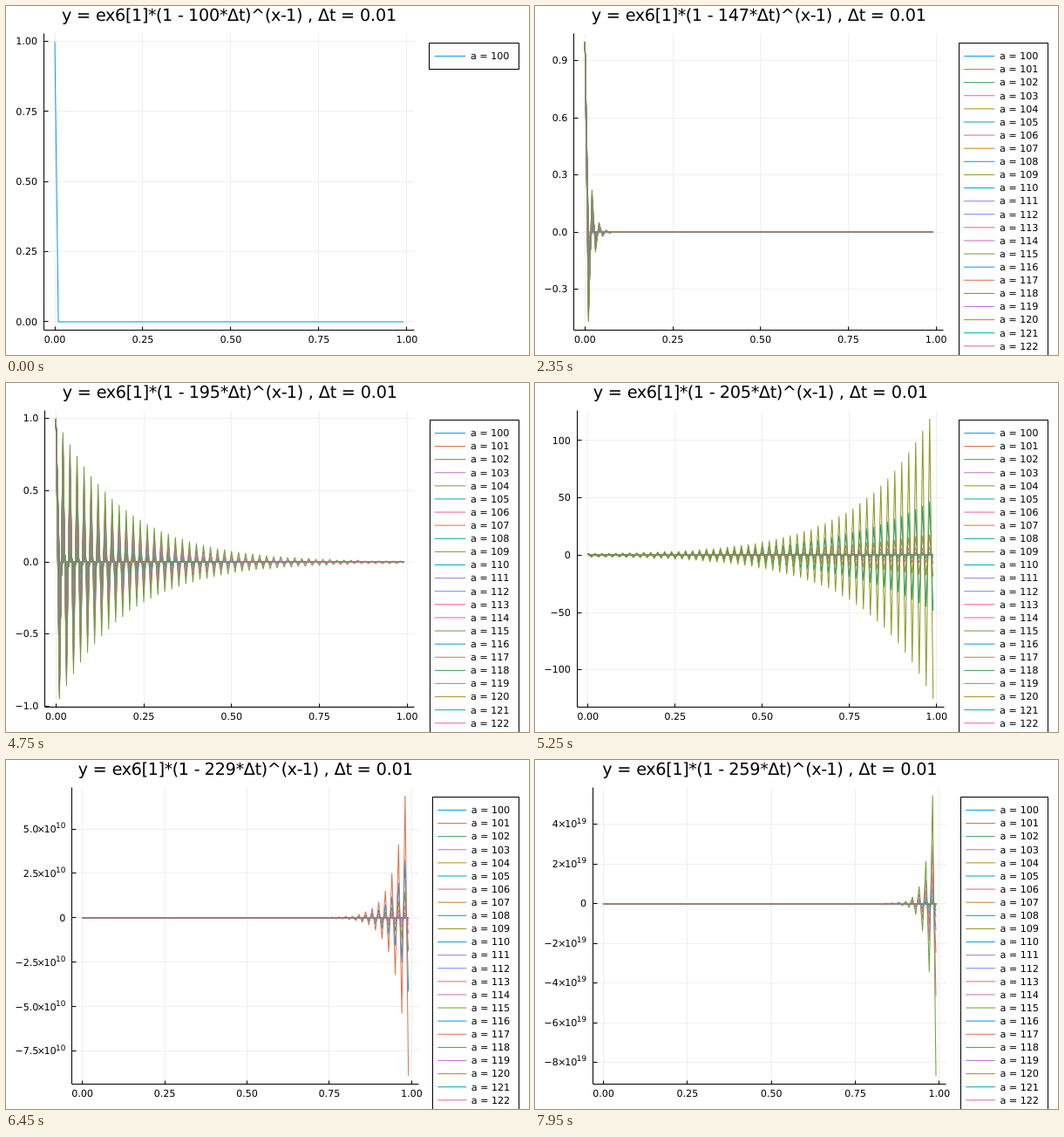
Write a matplotlib script that moves like this. It is 600x400 px and loops after 8000 ms.

```python
import math

import numpy as np
import matplotlib.pyplot as plt
from matplotlib.animation import FuncAnimation
from matplotlib.collections import LineCollection
from matplotlib.patches import PathPatch, Rectangle
from matplotlib.path import Path
from matplotlib.textpath import TextPath

plt.rcParams["font.family"] = "DejaVu Sans"

WIDTH, HEIGHT, DPI = 600, 400, 100
FRAMES, INTERVAL = 160, 50
FIRST_A, DT, POINTS = 100, 0.01, 100
PX = 72 / DPI

TOP, BOTTOM = 31.0, 371.5
SMALL, SUP, LARGE = 11.1, 8.9, 19.25
TICK = 4.5
LEGEND_TOP, LEGEND_RIGHT, ROW = 42.3, 588, 15.11
VISIBLE_ROWS = 23

PALETTE = ["#009AFA", "#E36F47", "#3EA44E", "#C371D2", "#AC8E18", "#00AAAE",
           "#ED5E93", "#C68225", "#00A98D", "#8E971E", "#00A9CC", "#9B7FE8",
           "#618CF6", "#F06073", "#DD65B6", "#6C9F33"]
COLORS = [PALETTE[i % len(PALETTE)] for i in range(FRAMES)]

times = np.arange(POINTS) * DT
ratios = -np.arange(FRAMES) / 100
curves = ratios[:, None] ** np.arange(POINTS)[None, :]


# ---- text ----

glyphs = {}


def glyph(char, size):
    key = char, size
    if key not in glyphs:
        wide = TextPath((0, 0), f"|{char}|", size=100).get_extents().width
        bare = TextPath((0, 0), "||", size=100).get_extents().width
        advance = (wide - bare) * size / 100
        if size == LARGE:
            advance = int(advance)  # large type steps by whole pixels
        if char == " ":
            glyphs[key] = None, None, advance
        else:
            path = TextPath((0, 0), char, size=size)
            glyphs[key] = path.vertices * [1, -1], path.codes, advance
    return glyphs[key]


def text_width(text, size):
    return sum(glyph(c, size)[2] for c in text)


class Writer:
    def __init__(self):
        self.verts, self.codes = [], []

    def put(self, text, x, y, size=SMALL, align=0.0):
        x -= align * text_width(text, size)
        y = round(y)
        for char in text:
            verts, codes, advance = glyph(char, size)
            if verts is not None:
                self.verts.append(verts + [x, y])
                self.codes.append(codes)
            x += advance

    def path(self):
        return Path(np.concatenate(self.verts), np.concatenate(self.codes))


# ---- ticks ----

NICE = [(5.0, 0.9), (3.0, 0.2), (2.5, 0.5), (2.0, 0.7), (1.0, 1.0)]


def find_ticks(lo, hi):
    """Pick the step with the best mix of count, coverage and niceness."""
    span = hi - lo
    order = math.floor(math.log10(span))
    best, choice = -1, None
    for exp in range(order + 1, order - 3, -1):
        for q, nice in NICE:
            step = q * 10.0 ** exp
            first, last = math.ceil(lo / step), math.floor(hi / step)
            count = last - first + 1
            if not 4 <= count <= 8:
                continue
            granularity = 1 - abs(count - 5) / 5
            coverage = 1.5 * span / ((count - 1) * step)
            score = granularity / 4 + coverage / 3 + nice / 4
            if score > best + 1e-9:
                best = score
                choice = [i * step for i in range(first, last + 1)]
    return choice


def decimals(values):
    d = 0
    while any(abs(round(v, d) - v) > 1e-7 for v in values):
        d += 1
    return d


def make_labels(ticks):
    """Return (number, exponent) pairs; the exponent is empty for plain ones."""
    if ticks[-1] - ticks[0] <= 1e4 * (1 + 1e-9):
        d = decimals(ticks)
        return [(f"{v:.{d}f}".replace("-", "−"), "") for v in ticks]
    exps = [math.floor(math.log10(abs(v)) + 1e-9) if v else 0 for v in ticks]
    mants = [v / 10.0 ** e for v, e in zip(ticks, exps)]
    d = decimals(mants)
    return [(f"{m:.{d}f}".replace("-", "−"), str(e)) if m else ("0", "")
            for m, e in zip(mants, exps)]


CROSS, TEN = 8, 13


def mantissa_width(number):
    return text_width(number, SMALL) - 1.3 * ("." in number)


def label_width(label):
    number, exp = label
    if not exp:
        return text_width(number, SMALL)
    return mantissa_width(number) + CROSS + TEN + text_width(exp, SUP)


def put_label(writer, label, right, y):
    number, exp = label
    x = right - label_width(label)
    writer.put(number, x, y)
    if exp:
        x += mantissa_width(number)
        writer.put("×", x - 0.5, y)
        writer.put("10", x + CROSS - 0.5, y)
        writer.put(exp, x + CROSS + TEN, y - 4.8, SUP)


# ---- figure ----

fig = plt.figure(figsize=(WIDTH / DPI, HEIGHT / DPI), dpi=DPI, facecolor="white")
ax = fig.add_axes([0, 0, 1, 1])
ax.set_xlim(0, WIDTH)
ax.set_ylim(HEIGHT, 0)
ax.axis("off")


def add_lines(color, zorder, snap):
    lines = LineCollection([], colors=color, linewidths=PX, zorder=zorder)
    lines.set_snap(snap)
    return ax.add_collection(lines, autolim=False)


grid = add_lines("#efefef", 1, True)
frame_lines = add_lines("black", 2, True)
data = add_lines(COLORS, 3, False)
box = ax.add_patch(Rectangle((0, 0), 1, 1, fc="white", ec="black", lw=PX, zorder=4))
keys = add_lines(COLORS, 5, False)
words = ax.add_patch(PathPatch(Path([(0, 0)]), fc="black", lw=0, zorder=6))


def pixel(v):
    # a little above the edge, so that snapping always picks this pixel
    return math.floor(v) + 0.1


def update(i):
    a = FIRST_A + i
    shown = curves[:i + 1]
    lo, hi = shown.min(), shown.max()
    pad = 0.03 * (hi - lo)
    lo, hi = lo - pad, hi + pad

    ticks = find_ticks(lo, hi)
    labels = make_labels(ticks)
    widest = max(labels, key=label_width)
    left = label_width(widest) + (18.4 if widest[0][0] == "−" else 19.3)
    width = (544.8 - left) / 1.1814
    right = left + width

    def to_x(t):
        return left + (t + 0.0297) / 1.0494 * width

    def to_y(v):
        return BOTTOM - (v - lo) / (hi - lo) * (BOTTOM - TOP)

    writer = Writer()
    x_axis, y_axis = pixel(BOTTOM), pixel(left - 0.5)
    grid_segs = []
    black = [[(y_axis, TOP), (y_axis, x_axis)],
             [(y_axis, x_axis), (right, x_axis)]]
    for t in np.arange(5) / 4:
        x = pixel(to_x(t))
        grid_segs.append([(x, TOP), (x, BOTTOM)])
        black.append([(x, x_axis), (x, x_axis - TICK)])
        writer.put(f"{t:.2f}", to_x(t), 386, align=0.5)
    for v, label in zip(ticks, labels):
        y = pixel(to_y(v))
        grid_segs.append([(left, y), (right, y)])
        black.append([(y_axis, y), (y_axis + TICK, y)])
        put_label(writer, label, left - 8, to_y(v) + 3.7)
    grid.set_segments(grid_segs)
    frame_lines.set_segments(black)

    xs = np.broadcast_to(to_x(times), shown.shape)
    data.set_segments(np.stack([xs, np.round(to_y(shown))], axis=-1))

    unit = width / 36
    box_left = LEGEND_RIGHT - 43.2 - 5 * unit
    text_x = box_left + 4 * unit
    box_x, box_y = pixel(box_left), pixel(LEGEND_TOP)
    box.set_bounds(box_x, box_y, pixel(LEGEND_RIGHT) - box_x, round(ROW * (i + 2)))
    key_segs = []
    for row in range(min(i + 1, VISIBLE_ROWS)):
        y = LEGEND_TOP + ROW * (row + 1)
        key_segs.append([(text_x - 3.5 * unit, y), (text_x - 0.5 * unit, y)])
        writer.put(f"a = {FIRST_A + row}", text_x, y + 3.8)
    keys.set_segments(key_segs)

    writer.put(f"y = ex6[1]*(1 - {a}*Δt)^(x-1) , Δt = 0.01",
               (left + right) / 2, 17, LARGE, 0.5)
    words.set_path(writer.path())
    return grid, frame_lines, data, box, keys, words


anim = FuncAnimation(fig, update, frames=FRAMES, interval=INTERVAL,
                     init_func=lambda: update(0), repeat=True, repeat_delay=0)
plt.show()
```
